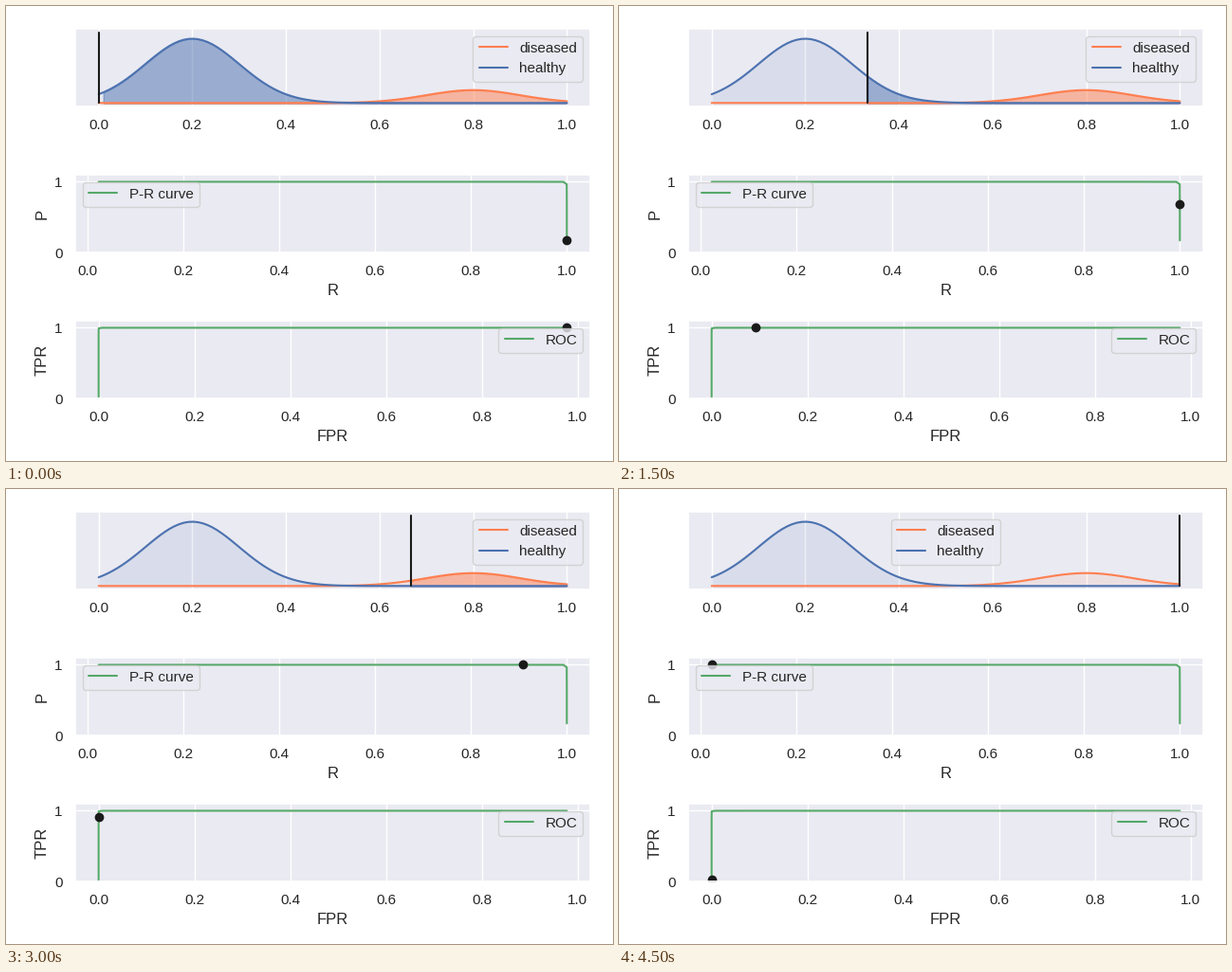
These frames come from a looping animation (640 px wide and 480 px high, 5000 ms). A matplotlib script:

```python
import math

import numpy as np
import matplotlib.pyplot as plt
from matplotlib.animation import FuncAnimation

W, H, DPI = 640, 480, 100
STEPS, INTERVAL = 10, 500
BLUE, GREEN, CORAL = "#4c72b0", "#55a868", "coral"
INK, TEXT, PANEL = "#1a1a1a", "#262626", "#eaeaf2"
RATIO = 5  # healthy cases per diseased case
MU_HEALTHY, MU_DISEASED, SIGMA = 0.2, 0.8, 0.1

plt.rcParams.update({
    "font.family": "Liberation Sans",
    "font.size": 12,
    "text.color": TEXT,
    "axes.labelcolor": TEXT,
    "axes.labelsize": 12,
    "axes.facecolor": PANEL,
    "axes.edgecolor": "white",
    "axes.linewidth": 1.25,
    "axes.axisbelow": True,
    "axes.grid": True,
    "grid.color": "white",
    "grid.linewidth": 1,
    "lines.linewidth": 1.5,
    "lines.solid_capstyle": "round",
    "patch.linewidth": 1,
    "legend.fontsize": 11,
    "xtick.labelsize": 11,
    "ytick.labelsize": 11,
    "xtick.color": TEXT,
    "ytick.color": TEXT,
    "xtick.major.size": 6,
    "ytick.major.size": 6,
    "xtick.bottom": False,
    "ytick.left": False,
})


def bell(x, mu):
    return np.exp(-0.5 * ((x - mu) / SIGMA) ** 2)


def tail(t, mu):
    return 0.5 * math.erfc((t - mu) / (SIGMA * math.sqrt(2)))


def panel(top):
    left, right, height = 73, 616, 82
    return fig.add_axes([left / W, 1 - (top + height) / H,
                         (right - left) / W, height / H])


def rate_panel(top, x, y, xlabel, ylabel, name, loc):
    """Curve with a moving dot; returns the dot."""
    ax = panel(top)
    ax.plot(x, y, color=GREEN, label=name)
    dot, = ax.plot([], [], "o", color=INK, ms=6)
    pad = 0.05 * (x.max() - x.min())
    ax.set(xlim=(x.min() - pad, x.max() + pad), ylim=(0, 1.1),
           yticks=[0, 1], xlabel=xlabel, ylabel=ylabel)
    ax.legend(loc=loc)
    return dot


fig = plt.figure(figsize=(W / DPI, H / DPI), dpi=DPI, facecolor="white")

x = np.linspace(0, 1, 100)
curves = [(bell(x, MU_DISEASED) / RATIO, CORAL, "diseased"),
          (bell(x, MU_HEALTHY), BLUE, "healthy")]

thresholds = np.linspace(0, 1, STEPS)
tpr = np.array([tail(t, MU_DISEASED) for t in thresholds])
fpr = np.array([tail(t, MU_HEALTHY) for t in thresholds])
precision = tpr / (tpr + RATIO * fpr)

dist = panel(24)
for y, color, name in curves:
    dist.plot(x, y, color=color, label=name)
cut, = dist.plot([], [], color=INK)
dist.set(xlim=(-0.05, 1.05), ylim=(-0.055, 1.155), yticks=[])
legend = dist.legend(loc="upper right")

pr_dot = rate_panel(178, tpr, precision, "R", "P", "P-R curve", "upper left")
roc_dot = rate_panel(332, fpr, tpr, "FPR", "TPR", "ROC", "upper right")

fills = []


def shade(part, alpha):
    for y, color, _ in curves:
        fills.append(dist.fill_between(x[part], y[part], color=color,
                                       alpha=alpha))


def update(n):
    while fills:
        fills.pop().remove()
    t = thresholds[n]
    i = round(t * (len(x) - 1))
    if i > 0:
        shade(slice(0, i + 1), 0.1)
    if i < len(x) - 1:
        shade(slice(max(i, 1), None), 0.5)
    cut.set_data([t, t], [0, 1.1])
    pr_dot.set_data([tpr[n]], [precision[n]])
    roc_dot.set_data([fpr[n]], [tpr[n]])
    # the legend makes way once the cut reaches it
    legend.set_loc("upper center" if t > 0.8 else "upper right")
    return []


anim = FuncAnimation(fig, update, frames=STEPS, interval=INTERVAL,
                     init_func=lambda: update(0), repeat=True,
                     repeat_delay=0, blit=False)
plt.show()
```
